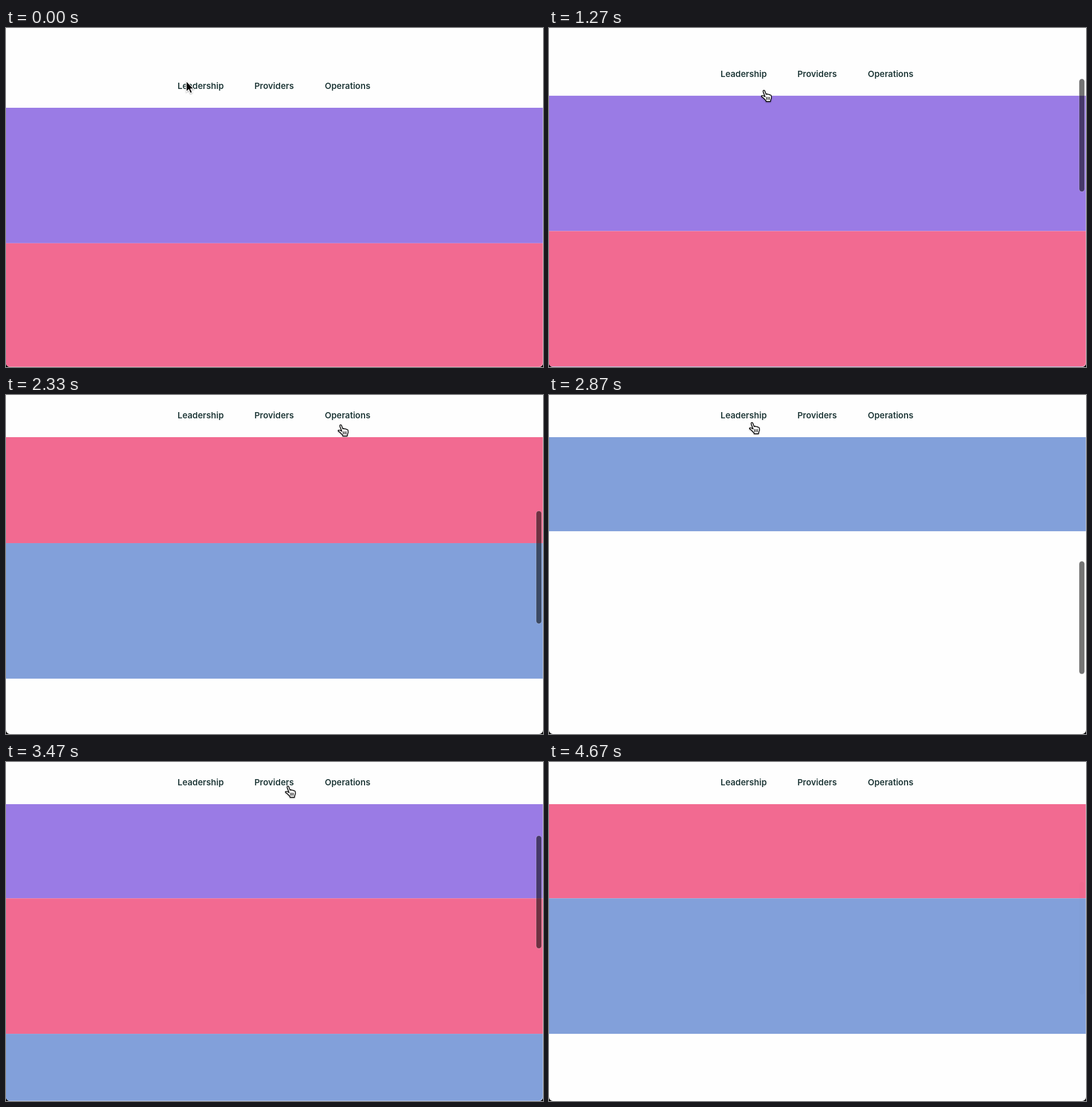
These frames come from a looping animation (942 px wide and 595 px high, 5190 ms). An HTML page:

```html
<!DOCTYPE html>
<html lang="en">
<head>
<meta charset="utf-8">
<title>Sticky navigation</title>
<style>
  html, body { margin: 0; width: 100%; height: 100%; overflow: hidden; background: #000; }
  #stage {
    position: relative; width: 942px; height: 595px; overflow: hidden;
    background: #fefefe; border-radius: 0 0 7px 7px;
  }
  #stage::after {
    content: ""; position: absolute; inset: 0; border-radius: inherit;
    box-shadow: inset -1px -1px rgba(255, 255, 255, .35);
  }
  svg { display: block; }
  text { font: 600 15px Inter, sans-serif; fill: #1f3838; text-anchor: middle; }
  #cursor { filter: drop-shadow(0 1.5px 1.2px rgba(0, 0, 0, .35)); }
</style>
</head>
<body>
<div id="stage">
  <svg width="942" height="595" viewBox="0 0 942 595">
    <g id="page">
      <rect y="140" width="942" height="237.8" fill="#9a7be5"/>
      <rect y="377.8" width="942" height="237.8" fill="#f26a91"/>
      <rect y="615.6" width="942" height="237.8" fill="#82a0da"/>
    </g>
    <g id="nav">
      <rect width="942" height="140" fill="#fefefe"/>
      <text x="341.5" y="107">Leadership</text>
      <text x="470.3" y="107">Providers</text>
      <text x="599.2" y="107">Operations</text>
    </g>
    <rect id="bar" x="930" width="9.5" height="198" rx="4.7" fill="#000" fill-opacity=".54"
          stroke="#fff" stroke-opacity=".3"/>
    <g id="cursor">
      <path id="arrow" d="M0 0V19L4.4 15 7.2 21.6 10.5 20.2 7.7 13.8H13.2Z"
            stroke="#fff" stroke-width="1.3"/>
      <g id="hand" transform="translate(-5)" stroke="#000" stroke-linecap="round" stroke-linejoin="round">
        <path fill="#fff" stroke-width="1.4" d="M7.6 12.8L4.3 4C3.4 1.4 6 .3 7 2.6L9.4 8.6C10 7.4 12 7.4 12.5 8.9
          C13.3 8 15 8.2 15.4 9.6C16.6 9 18.2 9.8 18.5 11.6C19 14 18.6 15.6 17.4 18L17 21H9.4L9 19.2
          C7 17.6 5.6 15.6 4 14.2C.4 12.4 .6 10.6 2.6 10.6C4.6 10.6 6 11.6 7.6 12.8Z"/>
        <path fill="none" stroke-width="1.1" d="M10 13.2V17.8M12.5 13.2V17.8M15 13.2V17.8"/>
      </g>
    </g>
  </svg>
</div>
<script>
  const LOOP = 5190, STEP = 200 / 3, LAST = 70 * STEP;
  const [page, nav, bar, cursor, arrow, hand] =
    ['page', 'nav', 'bar', 'cursor', 'arrow', 'hand'].map(id => document.getElementById(id));

  // [start, end, ...values reached]
  const scrolls = [
    [1204, 1434, 138.5],
    [2153, 2533, 614.3],
    [3090, 3465, 138.5],
    [3700, 4050, 376.3]
  ];
  const moves = [
    [35, 330, 376.5, 108],
    [1730, 2000, 586.5, 51],
    [2390, 2866, 355.5, 47],
    [3190, 3466, 494, 41],
    [4290, 4500, 760, 22]
  ];

  const clamp = v => Math.min(1, Math.max(0, v));
  const mix = (a, b, p) => a + (b - a) * p;

  // cubic-bezier(.42, 0, .58, 1)
  function ease(x) {
    let lo = 0, hi = 1, u = .5;
    for (let i = 0; i < 18; i++) {
      u = (lo + hi) / 2;
      if (3 * u * (1 - u) * mix(.42, .58, u) + u ** 3 < x) lo = u; else hi = u;
    }
    return u * u * (3 - 2 * u);
  }

  function track(start, segments, t) {
    return segments.reduce((from, [t0, t1, ...to]) => {
      if (t <= t0) return from;
      if (t >= t1) return to;
      const p = ease(clamp((t - t0) / (t1 - t0)));
      return from.map((v, i) => mix(v, to[i], p));
    }, start);
  }

  function barAlpha(t) {
    if (t < 1204) return 0;
    return 1 - clamp((t - (t < 2153 ? 1870 : 4387)) / 285);
  }

  const show = (el, on) => el.setAttribute('visibility', on ? 'visible' : 'hidden');
  const shift = (el, x, y) => el.setAttribute('transform', `translate(${x} ${y})`);

  function draw(time) {
    // the screen refreshes fifteen times a second
    const t = Math.min(LAST, Math.floor((time + 3.4) / STEP) * STEP);
    const [top] = track([0], scrolls, t);
    const [x, y] = track([316.2, 93], moves, t);

    shift(page, 0, -top);
    shift(nav, 0, -Math.min(top, 66));
    bar.setAttribute('y', 82 + .3415 * top);
    bar.setAttribute('opacity', barAlpha(t));

    const gone = t > 4460;
    const pointing = t > 60 && t < 1460 || t > 1900 && t < 4320;
    shift(cursor, x, y);
    show(hand, pointing && !gone);
    show(arrow, !pointing && !gone);
  }

  const origin = performance.now();
  function tick() {
    draw((performance.now() - origin) % LOOP);
    requestAnimationFrame(tick);
  }
  tick();
</script>
</body>
</html>
```
